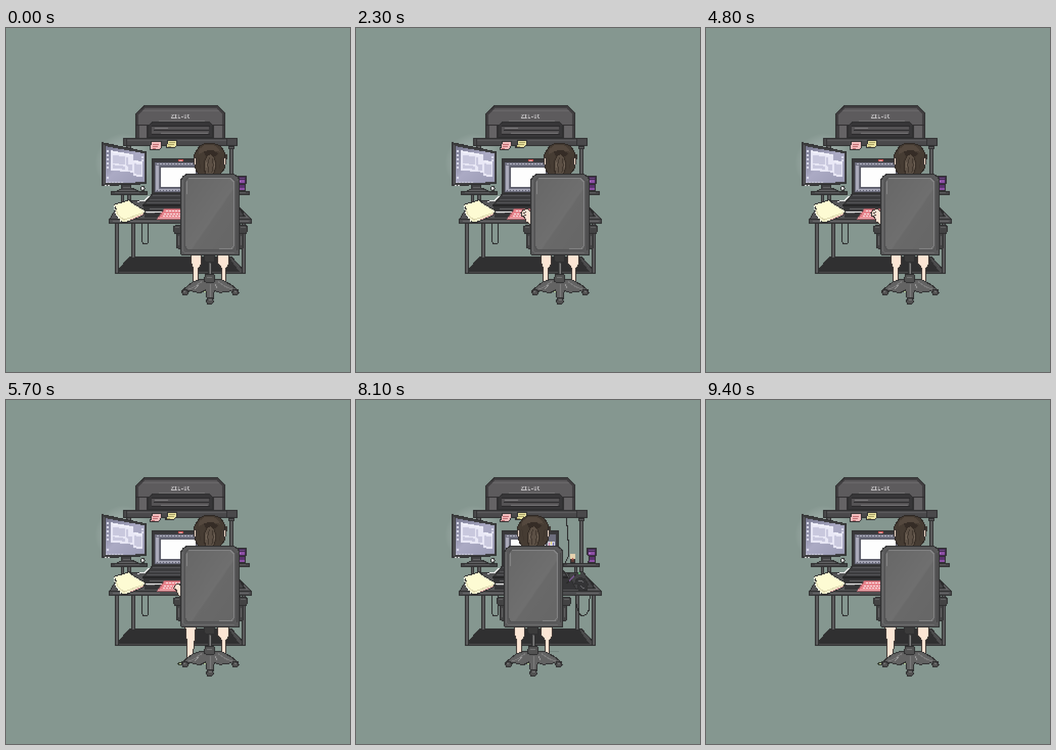
An HTML page for the animation above (9500 ms loop, 673 px wide and 673 px high).

```html
<!DOCTYPE html>
<html lang="en">
<head>
<meta charset="utf-8">
<title>Desk</title>
<style>
html, body { margin: 0; width: 100%; height: 100%; overflow: hidden; background: #859790; }
svg { display: block; width: 100vw; height: 100vh; shape-rendering: crispEdges; }
.o { stroke: #2f2f30; stroke-width: 2; }
.l { fill: none; stroke-width: 2; }
.skin { fill: #fbe5d4; stroke: #3b3431; stroke-width: 2; }
.label { font: bold 10.5px "DejaVu Sans Mono", monospace; fill: #c8c6c8; }
</style>
</head>
<body>
<svg viewBox="0 0 673 673">
  <defs>
    <!-- samples one pixel in every 2 x 2 block and spreads it over the block -->
    <filter id="pixels" filterUnits="userSpaceOnUse" x="161" y="131" width="340" height="430" color-interpolation-filters="sRGB">
      <feFlood x="161" y="131" width="1" height="1" flood-color="#000" result="dot"/>
      <feComposite in="dot" in2="dot" operator="over" x="161" y="131" width="2" height="2"/>
      <feTile result="grid"/>
      <feComposite in="SourceGraphic" in2="grid" operator="in" result="a"/>
      <feOffset in="a" dx="1" result="b"/>
      <feMerge result="row"><feMergeNode in="a"/><feMergeNode in="b"/></feMerge>
      <feOffset in="row" dy="1" result="c"/>
      <feMerge><feMergeNode in="row"/><feMergeNode in="c"/></feMerge>
    </filter>
    <radialGradient id="glow">
      <stop offset=".55" stop-color="#dce3e2" stop-opacity=".28"/>
      <stop offset="1" stop-color="#dce3e2" stop-opacity="0"/>
    </radialGradient>
    <linearGradient id="screen" x2=".9" y2="1">
      <stop stop-color="#777890"/><stop offset=".5" stop-color="#abaac4"/><stop offset="1" stop-color="#9c9cb6"/>
    </linearGradient>
    <linearGradient id="seat" x2="1" y2="1">
      <stop stop-color="#676767"/><stop offset=".55" stop-color="#6f6f6f"/><stop offset=".57" stop-color="#696969"/><stop offset="1" stop-color="#666"/>
    </linearGradient>
    <linearGradient id="tube" x2="1" y2="0">
      <stop stop-color="#4a4a4b"/><stop offset=".5" stop-color="#666667"/><stop offset="1" stop-color="#434344"/>
    </linearGradient>
  </defs>
  <rect width="673" height="673" fill="#859790"/>
  <ellipse cx="230" cy="264" rx="56" ry="58" fill="url(#glow)"/>

  <g filter="url(#pixels)">
  <!-- printer -->
  <path class="o" fill="#413f41" d="M254 167L270 152H414L428 166V216H254Z"/>
  <path fill="#5d5b5d" d="M259 168L272 157H411L423 168V188H259Z"/>
  <path fill="#6a686a" d="M268 160H415L418 163H265Z"/>
  <path fill="#656365" d="M261 191H275V215H261ZM407 191H423V215H407Z"/>
  <path class="l" stroke="#312f31" d="M255 190H280M403 190H428M276 189V215M406 189V215"/>
  <path class="l" stroke="#737173" d="M299 182H388"/>
  <path class="o" fill="#373638" d="M286 184H398L404 190V214H278V190Z"/>
  <path fill="#555355" d="M285 193H397V209H285Z"/>
  <path class="l" stroke="#29282a" d="M285 192H399M289 200H397M285 208H399"/>
  <path class="l" stroke="#7a787a" d="M291 196H317M303 206H395"/>
  <text class="label" x="322" y="175.5">ZIL-UC</text>

  <!-- upper posts and shelf -->
  <g class="o" fill="url(#tube)">
    <rect x="236" y="230" width="8" height="90"/>
    <rect x="438" y="230" width="6" height="90"/>
    <rect x="226" y="326" width="4" height="22"/>
    <rect x="238" y="326" width="6" height="22"/>
    <rect x="428" y="326" width="4" height="14"/>
    <rect x="438" y="326" width="6" height="14"/>
  </g>
  <path class="l" stroke="#29292a" d="M412 231V244L414 250V272L416 278V302L412 312L406 322"/>
  <rect class="o" x="230" y="216" width="222" height="14" fill="#4a494b"/>
  <path class="l" stroke="#5d5c5e" d="M235 220H433"/>
  <path class="l" stroke="#343335" d="M236 217V229M432 217V229"/>
  <rect class="o" x="436" y="232" width="10" height="4" fill="#5b5a5c"/>

  <!-- notes -->
  <g id="notesA">
    <path class="o" fill="#f5bfc0" d="M284 222H304V233L299 238H282V230Z"/>
    <path class="l" stroke="#bd686d" d="M287 228H299M287 232H297M287 236H293"/>
    <path class="o" fill="#efe8a6" d="M316 219H333V230L329 234H314V228Z"/>
    <path class="l" stroke="#a39b61" d="M319 224H331M317 228H329M317 232H323"/>
  </g>
  <g id="notesB">
    <path class="o" fill="#f5bfc0" d="M285 222H304L302 233L297 238L281 237L284 230Z"/>
    <path class="l" stroke="#bd686d" d="M287 228H299M287 232H297M285 236H291"/>
    <path class="o" fill="#efe8a6" d="M316 219H333V228L327 234H311L315 228Z"/>
    <path class="l" stroke="#a39b61" d="M319 224H331M317 228H329M315 232H321"/>
  </g>

  <!-- monitor -->
  <path class="o" fill="#414143" d="M226 304H244V312L262 320H213L226 314Z"/>
  <path class="l" stroke="#656567" d="M229 312H243M221 318H253"/>
  <path class="o" fill="#3d3d3f" d="M188 224L274 242V304L188 308Z"/>
  <path class="l" stroke="#616164" d="M192 229V305"/>
  <path fill="url(#screen)" d="M195 231L271 245V301L195 303Z"/>
  <path fill="#e9e8f6" d="M205 239L249 247V258L267 261V291L249 289V283L239 281L205 278Z"/>
  <path fill="#c9c8de" d="M209 248L233 251V267L209 264ZM235 252L239 253V270L235 269ZM209 267L233 270V276L209 274ZM251 265L265 267V287L251 285ZM239 266L247 267V279L239 278Z"/>
  <path class="l" stroke="#f4f4fb" d="M207 242L249 249M251 260L267 263"/>
  <path fill="#dedeee" d="M197 239h4v4h-4zM197 247h4v4h-4zM197 255h4v4h-4zM197 263h4v4h-4zM197 271h4v4h-4zM197 291h4v4h-4zM265 251h4v4h-4zM265 257h4v4h-4z"/>
  <path class="l" stroke="#cfcfdf" stroke-dasharray="4 2" d="M195 302H231"/>
  <path class="l" stroke="#dcdcdc" stroke-dasharray="4 2" d="M193 308H203"/>

  <!-- side shelves -->
  <g class="o" fill="#454547">
    <rect x="206" y="320" width="70" height="6"/>
    <rect x="406" y="320" width="70" height="6"/>
  </g>
  <path class="l" stroke="#5d5d5f" d="M213 322H261M413 322H469"/>
  <path class="o" fill="#aaa" d="M265 310H269L271 314L269 318H265L263 314Z"/>
  <path fill="#eee" d="M265 311h4v4h-4z"/>
  <path class="o" fill="#5b3a35" d="M420 308H428V318H420Z"/>
  <path fill="#e6d3af" d="M419 301H429V311H419Z"/>
  <path fill="#af5650" d="M423 309h2v4h-2z"/>
  <path class="o" fill="#5b3270" d="M456 306H468V318H454Z"/>
  <path class="o" fill="#412a4e" d="M452 290H470V302L466 306H456L452 302Z"/>
  <path fill="#8f50a8" d="M455 297H467V303H455ZM457 313H467V317H457Z"/>
  <path class="l" stroke="#6f4884" d="M455 294H467"/>
  <path class="l" stroke="#b883cb" d="M455 300H459"/>

  <!-- lower board, legs and cables -->
  <path class="o" fill="#303031" d="M241 448H441L467 476V480H216V476Z"/>
  <path fill="#4c4c4d" d="M437 450L441 449L465 476H456ZM217 477H467V479H217Z"/>
  <g class="o" fill="url(#tube)">
    <rect x="246" y="380" width="6" height="70"/>
    <rect x="430" y="380" width="6" height="70"/>
    <rect x="214" y="380" width="6" height="100"/>
    <rect x="462" y="380" width="6" height="100"/>
  </g>
  <path class="l" stroke="#29292a" d="M266 382V418L269 422H275L278 418V382M430 382L429 393L433 408L437 419L442 422L450 419L455 411L457 382"/>
  <path fill="#748580" d="M379 491H397V493H379Z"/>

  <!-- desktop -->
  <path class="o" fill="#555557" d="M236 338H444L480 374H202L214 354Z"/>
  <path fill="#353537" d="M268 346H430L452 371H270Z"/>
  <path class="l" stroke="#656567" d="M446 344L472 371M275 362H291M281 354H341"/>
  <rect class="o" x="202" y="374" width="278" height="8" fill="#4e4e50"/>
  <path class="l" stroke="#68686a" d="M209 378H301M431 378H475"/>

  <!-- laptop -->
  <path class="o" fill="#3b3b3d" d="M286 324H398L414 346H268Z"/>
  <path class="l" stroke="#555558" d="M287 328H397M281 336H405M275 342H409"/>
  <path fill="#262627" d="M267 345H415V349H267Z"/>
  <rect class="o" x="286" y="256" width="110" height="68" fill="#39393b"/>
  <path fill="#6d6e7e" d="M291 263H391V321H291Z"/>
  <path fill="#aaaaba" d="M293 269H299V315H293ZM293 315H391V319H293Z"/>
  <path class="l" stroke="#c0c0ce" stroke-dasharray="4 2" d="M295 266H377"/>
  <path class="l" stroke="#505262" stroke-dasharray="2 4" d="M295 318H383"/>
  <path fill="#fdfdfd" stroke="#51525f" stroke-width="2" d="M302 272H372V312H302Z"/>
  <path fill="#cf5252" d="M337 257H347V261H337Z"/>
  <path fill="#f0b6b8" d="M339 259H345V261H339Z"/>
  <path fill="#dcdce8" d="M375 277H389V287H375Z"/>
  <path fill="#d77f9c" d="M377 279h2v6h-2z"/>
  <path fill="#e2cf66" d="M381 277h2v6h-2z"/>
  <path fill="#6460a8" d="M385 279h2v6h-2z"/>

  <!-- pen tablet and mouse -->
  <path class="o" fill="#434345" d="M414 339L444 336L466 367L430 370Z"/>
  <path class="l" stroke="#29292a" d="M411 359L429 341"/>
  <path class="l" stroke="#76558c" d="M416 354L426 344"/>
  <path fill="#5aa068" d="M435 337h4v4h-4z"/>
  <path class="o" fill="#343436" d="M430 352L436 347L447 350L453 359L451 371L440 374L433 369L435 361L428 359Z"/>
  <path class="l" stroke="#6d6d70" d="M435 353L444 355M439 364L447 369"/>
  <path class="l" stroke="#29292a" d="M453 349L463 358V369"/>

  <!-- keyboard, leads and papers -->
  <path class="l" stroke="#f5f5f5" d="M256 341L264 337H271L279 329M270 360H309"/>
  <path fill="#e8838c" stroke="#a95e66" stroke-width="2" d="M310 353H393L402 373H296Z"/>
  <path class="l" stroke="#fae9ea" stroke-width="3" stroke-dasharray="4 2" d="M313 357H389M309 363H391M307 367H393"/>
  <path class="l" stroke="#f3b0b5" d="M297 372H401"/>
  <path class="o" fill="#fdfbd3" d="M211 345L241 336L247 342L272 357L268 366L234 380L226 379L213 363L215 354Z"/>
  <path class="l" stroke="#ddd7ae" d="M215 354L218 364L230 375L268 361"/>
  <path class="l" stroke="#dba5a3" d="M242 375L268 364"/>
  <path class="l" stroke="#fffef0" stroke-dasharray="4 2" d="M211 347L214 363L225 378"/>

  <!-- left hand, three reaches -->
  <g id="hands">
    <path class="skin" d="M344 362L335 359L330 363L328 368L334 372L335 380L344 387Z"/>
    <g>
      <path class="skin" d="M344 361L334 353L326 356L322 362L324 367L330 371L332 378L344 387Z"/>
      <path class="l" stroke="#3b3431" d="M326 362L332 360M327 367L333 364"/>
    </g>
    <g>
      <path class="skin" d="M344 367L337 357L331 352L326 354L321 358L319 368L327 373L329 382L344 388Z"/>
      <g id="fingers">
        <path class="skin" d="M331 359L323 350L318 351L323 361Z"/>
        <path class="skin" d="M325 365L317 357L316 362L322 369Z"/>
      </g>
    </g>
  </g>

  <!-- sitter and chair -->
  <g id="chair">
    <g id="legRest">
      <path class="skin" d="M362 442H382V460L376 470V496H366V470L362 460Z"/>
    </g>
    <g id="legOut">
      <path fill="#cde0a0" stroke="#333b30" stroke-width="2" d="M336 515L345 512L352 514V518H337Z"/>
      <path class="skin" d="M350 442H371L369 468L364 504L352 511L354 482Z"/>
    </g>
    <path class="skin" d="M414 442H436V460L430 470V496H422V470L414 460Z"/>
    <path fill="#bad29b" d="M387 513h4v4h-4zM417 513h4v4h-4z"/>

    <path class="o" fill="#636363" d="M389 492H408L420 491L440 502L453 512L455 518H444L440 514L418 517L407 513L405 530H393L390 512L379 518L358 513L354 520H345L344 513L364 497L380 491Z"/>
    <path class="l" stroke="#7d7d7d" d="M382 496L368 506L356 511M415 496L430 506L444 511M399 501V527"/>
    <path class="l" stroke="#9d9d9d" d="M376 502L369 510M408 500L413 509"/>
    <g class="o" fill="#525252">
      <path d="M346 512H354L356 518L353 522H346L344 518Z"/>
      <path d="M444 512H452L454 518L452 522H445L442 518Z"/>
      <path d="M394 528H403L405 535L402 540H395L391 535Z"/>
    </g>
    <path class="l" stroke="#777" d="M347 516H351M447 516H451M397 532H403"/>
    <path class="o" fill="#3b3b3b" d="M388 443H408V455L404 458H392L388 455Z"/>
    <path class="o" fill="#555" d="M396 458H402V484H396Z"/>
    <path class="l" stroke="#858585" d="M400 461V481"/>
    <path class="o" fill="#525252" d="M390 482H406L408 487V495L404 498H393L388 495V487Z"/>
    <path class="l" stroke="#777" d="M393 488H403"/>

    <g class="o" fill="#434344">
      <path d="M334 398H345V432H338L334 429Z"/>
      <path d="M455 398H464V429L460 432H455Z"/>
      <path d="M328 388L331 386H344V402H331L328 398Z"/>
      <path d="M455 386H469L472 389V397L468 402H455Z"/>
    </g>
    <path class="l" stroke="#626263" d="M331 390H339M459 390H469M338 407V425M460 407V425"/>

    <path fill="#463c33" stroke="#2c2622" stroke-width="2" d="M372 240L378 231L388 226H408L418 230L424 237L428 246L429 262L427 274L421 282L415 288H380L373 281L369 270L367 258L368 248Z"/>
    <path fill="#54483e" d="M378 236L388 229H406L414 234L419 242L410 240H389L376 247Z"/>
    <path fill="#fbe5d4" stroke="#3b3431" stroke-width="2" d="M368 254H371V268H369L367 262ZM426 254H430V262L428 268H426Z"/>
    <path fill="#3a3430" d="M429 247H433V257H429Z"/>
    <path fill="#352c26" d="M385 242L393 239H406L414 245L409 251L401 246L391 250Z"/>
    <path fill="#5c5045" stroke="#332a23" stroke-width="2" d="M393 249L399 246L406 250L410 264L408 280L402 288H392L387 276L388 260Z"/>
    <path class="l" stroke="#40362e" d="M398 252L394 266L396 283M403 254L405 268L402 283M376 252L380 274M421 252L417 275"/>
    <path class="l" stroke="#75685b" d="M392 262V273M407 262V272"/>

    <path class="o" fill="#5a5a5b" d="M352 286H446L452 290L456 296V442L454 444H344L342 442V296L346 290Z"/>
    <path class="l" stroke="#6c6c6d" d="M346 297V436L351 440H447"/>
    <path fill="url(#seat)" stroke="#535354" stroke-width="2" d="M356 292H440L446 296L448 302V426L446 432L440 434H358L352 432L350 426V302L352 296Z"/>
    <path class="l" stroke="#858586" d="M357 294H439L446 301V425L440 432H417M354 299V325"/>
    <path class="l" stroke="#464647" d="M452 298V434"/>
  </g>
  </g>
</svg>
<script>
const LOOP = 9500, STEP = 100;
const el = id => document.getElementById(id);
const show = (node, on) => { node.style.display = on ? "" : "none"; };
const hands = [...el("hands").children];

// [step, value]: each value holds until the next step
const reach = [[0, 0], [3, 1], [5, 2], [7, 3], [17, 2], [25, 3], [46, 2], [50, 1], [61, 0]];
const slide = [[0, 0], [61, -18], [62, -36], [63, -52], [91, -36], [92, -18], [93, 0]];
const push = [[0, 0], [54, 1], [63, 0], [91, 1]];
const hold = (keys, n) => keys.filter(k => k[0] <= n).pop()[1];

let last = -1;
function draw(now) {
  const n = Math.floor(now % LOOP / STEP);
  if (n === last) return;
  last = n;
  const odd = n % 2;
  const out = hold(push, n);
  show(el("notesA"), !odd);
  show(el("notesB"), odd);
  hands.forEach((hand, i) => show(hand, hold(reach, n) === i + 1));
  el("fingers").setAttribute("transform", `translate(0 ${odd ? 0 : 2})`);
  show(el("legOut"), out);
  show(el("legRest"), !out);
  el("chair").setAttribute("transform", `translate(${hold(slide, n)} 0)`);
}

const start = performance.now();
function tick() {
  draw(performance.now() - start);
  requestAnimationFrame(tick);
}
tick();
</script>
</body>
</html>
```
